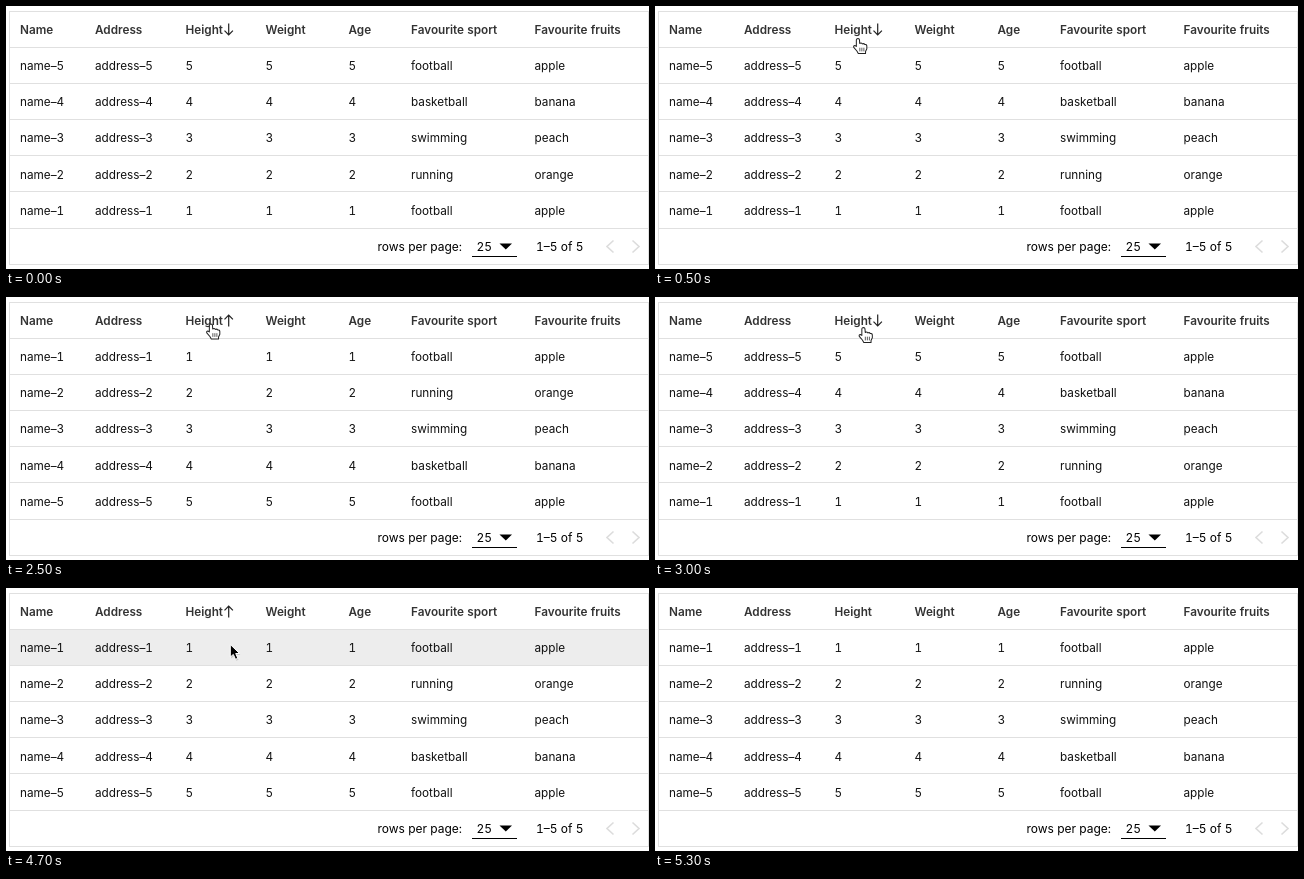
An HTML page that plays this animation: 643 by 263 pixels, repeating every 6 s.

```html
<!DOCTYPE html>
<html lang="en">
<head>
<meta charset="utf-8">
<title>Sortable table</title>
<style>
  html, body { margin: 0; width: 100%; height: 100%; overflow: hidden; background: #fff; }
  svg { display: block; }
  text { font: 11.75px Inter, "Open Sans", sans-serif; font-variant-numeric: tabular-nums; fill: #111; }
  .head { font-weight: 600; fill: #333; }
  .foot { font-size: 12px; fill: #000; }
  .line { fill: none; stroke: #e0e0e0; }
</style>
</head>
<body>
<svg id="stage" width="643" height="263" viewBox="0 0 643 263">
  <rect id="hover" x="4" width="638" fill="#ededed"/>
  <g id="grid" class="line"><rect x="3.5" y="5.5" width="639" height="253"/></g>
  <g id="cells"></g>
  <path id="sort" fill="none" stroke="#222" stroke-width="1.2"/>
  <text class="foot" x="371.5" y="245">rows per page:</text>
  <text class="foot" x="470.5" y="245">25</text>
  <path d="M493.5 237.5h12.5l-6.2 6z" fill="#000"/>
  <path d="M466 250.5h45" stroke="#000"/>
  <text class="foot" x="530" y="245">1–5 of 5</text>
  <path d="M607.5 234.5l-6.5 6 6.5 6M626.5 234.5l6.5 6-6.5 6" fill="none" stroke="#dcdcdc" stroke-width="1.6"/>
  <g id="arrow">
    <path d="M.8 1.5V14.1L3.8 11.4 6 16.3 8.3 15.3 6.2 10.5H10.1Z" fill="#000" opacity=".15"/>
    <path d="M0 0V12.6L3 9.9 5.2 14.8 7.5 13.8 5.4 9H9.3Z" fill="#000" stroke="#fff"/>
  </g>
  <g id="hand" stroke="#222" stroke-width="1.1" stroke-linejoin="round">
    <g transform="scale(.92)">
      <path d="M-1.8 8.6V1.4Q-1.6 0 0 0 1.5 .1 1.6 1.5L1.9 5.4Q3.7 4.4 4.8 5.9 6.4 5 7.4 6.6 9.5 6.1 9.6 8.3V11.2L8.2 14.2V16.2H.3L-1.2 13.6-4.6 9.6Q-5.2 7.6-3.4 7.6Z" fill="#fff"/>
      <path d="M2 10v4M4.2 10v4M6.4 10v4" stroke-width=".8"/>
    </g>
  </g>
</svg>
<script>
const LOOP = 6000, TICK = 100, TOP = 41, ROW = 36.2;
const $ = id => document.getElementById(id);
const columns = [14, 89, 179.5, 259.5, 342.5, 405, 528.5];
const titles = ["Name", "Address", "Height", "Weight", "Age", "Favourite sport", "Favourite fruits"];
const likes = [
  ["football", "apple"], ["running", "orange"], ["swimming", "peach"],
  ["basketball", "banana"], ["football", "apple"]
];

// Pointer stops: time, x, y; each holds until the next.
const stops = [
  [100, 312, 194], [200, 268, 120], [300, 238, 80], [400, 217, 52],
  [500, 203, 32.5], [600, 202.5, 30.5], [1400, 199, 26], [1500, 203, 29],
  [2500, 205, 27], [2600, 207.5, 28.5], [2700, 208.5, 30.5]
];
const LEAVE = 4700, GONE = 5300;

function add(parent, tag, attrs, text = "") {
  const node = document.createElementNS("http://www.w3.org/2000/svg", tag);
  for (const key in attrs) node.setAttribute(key, attrs[key]);
  node.textContent = text;
  return parent.appendChild(node);
}

const rowTop = i => Math.floor(TOP + ROW * i);

titles.forEach((title, i) => add($("cells"), "text", { x: columns[i], y: 28, class: "head" }, title));
for (let i = 0; i < 6; i++) add($("grid"), "path", { d: `M3 ${rowTop(i) + .5}H643` });

const rows = likes.map((pair, i) => {
  const group = add($("cells"), "g", {}), n = i + 1;
  [`name–${n}`, `address–${n}`, n, n, n, ...pair]
    .forEach((value, c) => add(group, "text", { x: columns[c], y: 0 }, value));
  return group;
});

function pointerAt(t) {
  if (t < stops[0][0] || t >= GONE) return null;
  if (t >= LEAVE) {
    const k = (t - LEAVE) / TICK;
    return [224.3 + 17 * k, 56.5 + 35 * k];
  }
  return stops.filter(stop => stop[0] <= t).pop().slice(1);
}

function show(node, visible) {
  node.style.display = visible ? "" : "none";
}

function render(ms) {
  const t = Math.floor(ms % LOOP / TICK) * TICK;
  const descending = t < 1000 || (t >= 3000 && t < 4100);

  rows.forEach((row, i) => {
    const place = descending ? 4 - i : i;
    row.setAttribute("transform", `translate(0 ${64 + ROW * place})`);
  });

  $("sort").setAttribute("d", descending
    ? "M222.7 17.5V29M218.5 24.6l4.2 4.4 4.2-4.4"
    : "M222.7 29.5V18M218.5 22.4l4.2-4.4 4.2 4.4");
  $("sort").style.opacity = t < 4800 ? 1 : t < 4900 ? .5 : 0;

  const pointer = pointerAt(t);
  const onHead = pointer && pointer[1] < TOP;
  const row = pointer ? Math.floor((pointer[1] - TOP) / ROW) : -1;
  const hovered = row >= 0 && row < 5;
  show($("hand"), onHead);
  show($("arrow"), pointer && !onHead);
  show($("hover"), hovered);
  if (pointer) $(onHead ? "hand" : "arrow").setAttribute("transform", `translate(${pointer})`);
  if (hovered) {
    $("hover").setAttribute("y", rowTop(row) + 1);
    $("hover").setAttribute("height", rowTop(row + 1) - rowTop(row) - 1);
  }
}

const start = performance.now();
function frame() {
  render(performance.now() - start);
  requestAnimationFrame(frame);
}
frame();
</script>
</body>
</html>
```
